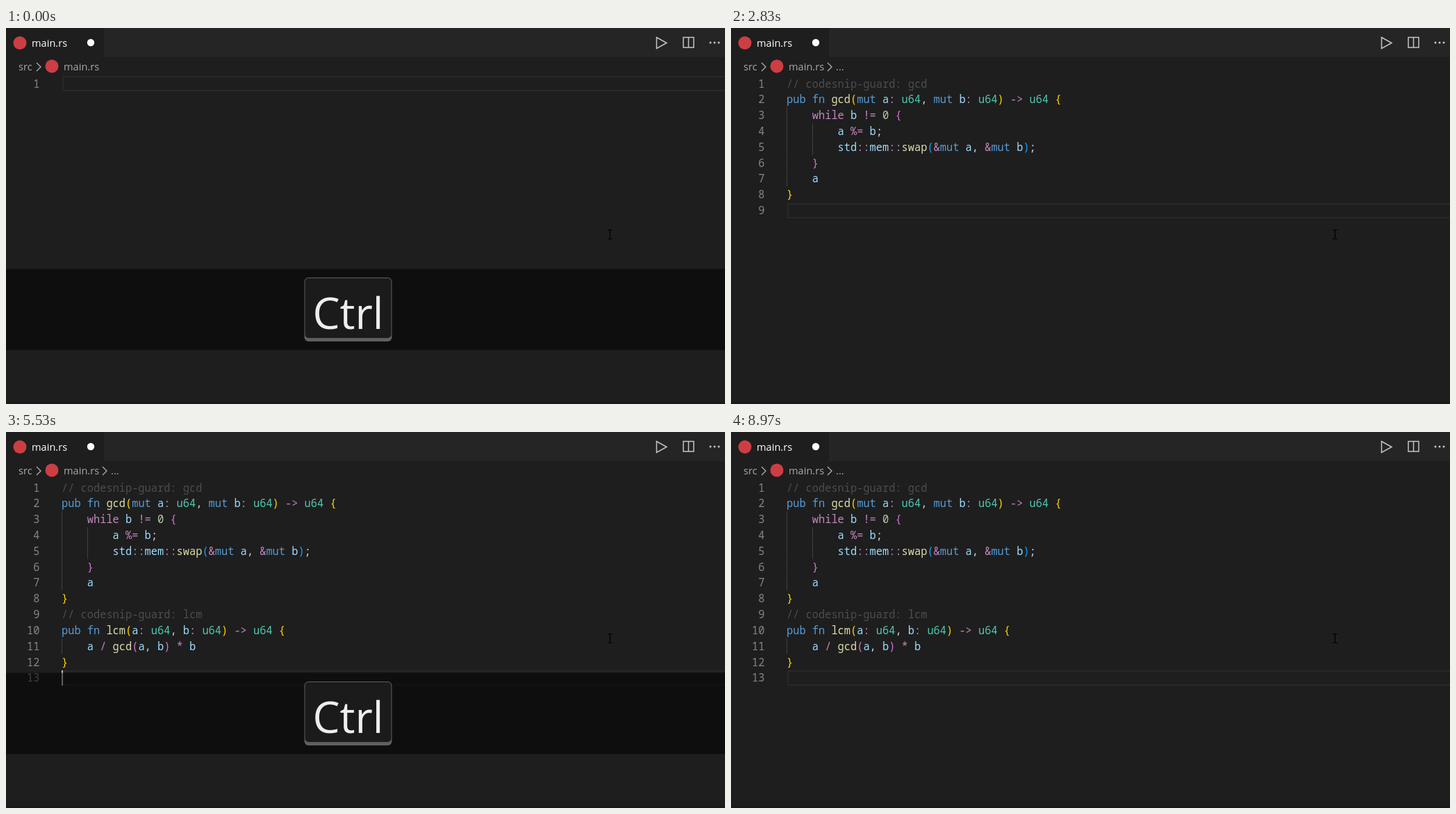
An HTML page with a canvas that plays this animation: 1035x541 px, repeating every 9.01 s.

```html
<!DOCTYPE html>
<html lang="en">
<head>
<meta charset="utf-8">
<title>Snippet insertion</title>
<style>
  html, body { margin: 0; width: 100%; height: 100%; overflow: hidden; background: #1e1e1e; }
  canvas { display: block; }
</style>
</head>
<body>
<canvas id="stage" width="1035" height="541"></canvas>
<script>
const ctx = document.getElementById('stage').getContext('2d');
const LOOP = 9010;
const UI = '14.6px "Open Sans", "Noto Sans", sans-serif';
const MONO = '15.33px "Noto Sans Mono", "DejaVu Sans Mono", monospace';
const KEY = '62px "Open Sans", "Noto Sans", sans-serif';
const LEFT = 80, CHAR = 9.2, LINE = 22.83;

const CODE = [
  '// codesnip-guard: gcd',
  'pub fn gcd(mut a: u64, mut b: u64) -> u64 {',
  '    while b != 0 {',
  '        a %= b;',
  '        std::mem::swap(&mut a, &mut b);',
  '    }',
  '    a',
  '}',
  '// codesnip-guard: lcm',
  'pub fn lcm(a: u64, b: u64) -> u64 {',
  '    a / gcd(a, b) * b',
  '}'
];
const BRACKETS = ['#ffd700', '#da70d6', '#179fff'];

// Split the code into coloured tokens; brackets take the colour of their depth.
let depth = 0;
const TOKENS = CODE.map(line =>
  [...line.matchAll(/\/\/.*|\w+|[(){}]|[;,]|[^\s\w(){};,]+/g)].flatMap(match => {
    const text = match[0], col = match.index, next = line[col + text.length];
    if (/^[({]/.test(text)) return { text, col, bracket: true, color: BRACKETS[depth++ % 3] };
    if (/^[)}]/.test(text)) return { text, col, bracket: true, color: BRACKETS[--depth % 3] };
    const color =
      text.startsWith('//') ? '#4d4d4d' :
      /^(pub|fn|mut)$/.test(text) ? '#569cd6' :
      text === 'while' ? '#c586c0' :
      text === 'u64' ? '#4ec9b0' :
      /^\d/.test(text) ? '#b5cea8' :
      /^\w/.test(text) ? (next === '(' ? '#dcdcaa' : '#9cdcfe') :
      /[;,]/.test(text) ? '#d4d4d4' : '#c586c0';
    return { text, col, color };
  }));

const LISTS = {
  '': ['primes', 'MonoidalOperation', 'ConvexHullTrick', 'RollingHash', 'automaton',
       'PrimalDual', 'BitXorOperation', 'convex_hull'],
  g: ['gcd', 'graph', 'geometry', 'RollingHash', 'SegmentTree', 'bigint', 'digit_dp', 'tree_degree'],
  l: ['lcm', 'lis', 'LazySegmentTree', 'ConvexHullTrick', 'MonoidalOperation',
      'RollingHash', 'PrimalDual', 'convex_hull']
};

const PICKERS = [
  { open: 370, close: 1440, typed: 980, query: 'g' },
  { open: 3140, close: 4180, typed: 3750, query: 'l' },
  { open: 7190, close: 7820, typed: 7570, query: 'l' }
];
const KEYS = [
  [0, 'Ctrl'], [120, 'Ctrl+Alt'], [300, 'Ctrl+Alt+B'], [980, 'Ctrl+Alt+B G'],
  [1400, 'Ctrl+Alt+B G Enter'], [2200, ''],
  [2840, 'Ctrl'], [2940, 'Ctrl+Alt'], [3060, 'Ctrl+Alt+B'], [3750, 'Ctrl+Alt+B L'],
  [4100, 'Ctrl+Alt+B L Enter'], [4900, ''],
  [5410, 'Ctrl'], [5590, 'Ctrl+A'], [5990, 'Backspace'], [6790, ''],
  [6850, 'Ctrl'], [6960, 'Ctrl+Alt'], [7120, 'Ctrl+Alt+B'], [7570, 'Ctrl+Alt+B L'],
  [7770, 'Ctrl+Alt+B L Enter'], [8570, '']
];
// Number of code lines, and the first line each insertion adds.
const EDITS = [[0, 0, 0], [1870, 8, 0], [4430, 12, 8], [5990, 0, 0], [8230, 12, 0]];
const BLINK_STARTS = [[-500], [1440], [1870], [4180], [4430], [5990], [7820], [8230]];

const latest = (events, t) => events.filter(e => e[0] <= t).pop();
const within = (t, from, to) => t >= from && t < to;
const clamp = v => Math.max(0, Math.min(1, v));

function rect(x, y, w, h, color) {
  ctx.fillStyle = color;
  ctx.fillRect(x, y, w, h);
}

function disc(x, y, r, color) {
  ctx.fillStyle = color;
  ctx.beginPath();
  ctx.arc(x, y, r, 0, 2 * Math.PI);
  ctx.fill();
}

function stroke(path, color, width) {
  ctx.strokeStyle = color;
  ctx.lineWidth = width;
  ctx.stroke(new Path2D(path));
}

function label(text, x, y, color, font = UI, align = 'left') {
  ctx.font = font;
  ctx.textAlign = align;
  ctx.fillStyle = color;
  ctx.fillText(text, x, y);
}

function drawChrome(t) {
  rect(0, 0, 1035, 541, '#1e1e1e');
  rect(141, 0, 894, 42, '#252526');
  rect(0, 538, 1035, 3, '#1a1a1a');
  disc(20, 21.5, 9.5, '#cc3e44');
  label('main.rs', 37, 27, '#ffffff');
  disc(122, 21, 5.2, '#ffffff');

  stroke('M936.5 13.5 L951 21.5 L936.5 29.5 Z', '#c5c5c5', 1.5);
  stroke('M975 13.5 H990 V28 H975 Z M982.5 13.5 V28', '#c5c5c5', 1.5);
  for (const x of [1014, 1020, 1026]) disc(x, 21, 1.5, '#c5c5c5');

  label('src', 18, 61, '#a9a9a9');
  stroke('M44 50 L50 56 L44 62', '#a9a9a9', 1.4);
  disc(66, 55, 9.5, '#cc3e44');
  label('main.rs', 83, 61, '#a9a9a9');
  if (within(t, 1960, 6500) || t >= 8300) {
    stroke('M139 50 L145 56 L139 62', '#a9a9a9', 1.4);
    label('...', 151, 61, '#a9a9a9');
  }
}

function drawEditor(t, pickerOpen) {
  const [editTime, count, firstNew] = latest(EDITS, t);
  const center = i => 80 + i * LINE;
  const selected = within(t, 5590, 5990);

  if (!selected) {
    ctx.strokeStyle = '#282828';
    ctx.lineWidth = 2;
    ctx.strokeRect(82, Math.round(center(count)) - 10, 960, 20);
  }

  for (let i = 0; i <= count; i++) {
    const y = center(i), line = CODE[i];
    label(i + 1, 48.5, y + 5.5, '#858585', MONO, 'right');
    if (i === count) break;
    if (selected) rect(LEFT, y - LINE / 2, (line.length + 1) * CHAR, LINE, '#264f78');
    const indent = line.search(/\S/);
    for (let col = 0; col < indent; col += 4)
      rect(Math.round(LEFT + col * CHAR), y - LINE / 2, 1, LINE, '#404040');
    const plain = i >= firstNew && t < editTime + 120;
    for (const token of TOKENS[i])
      label(token.text, LEFT + token.col * CHAR, y + 5.5,
        token.bracket && plain ? '#d4d4d4' : token.color, MONO);
  }

  const blinkStart = latest(BLINK_STARTS, t)[0];
  if (!pickerOpen && Math.floor((t - blinkStart) / 500) % 2 === 0)
    rect(80, Math.round(center(count)) - 11, 2, 22, '#c0c0be');
}

function drawPicker(t, { open, typed, query }) {
  const text = t >= typed ? query : '';
  const age = t - open;
  ctx.save();
  ctx.shadowColor = '#000';
  ctx.shadowBlur = 9;
  ctx.shadowOffsetY = 1;
  rect(152, -4, 688, 270, '#252526');
  ctx.restore();

  rect(159, 8, 674, 32, '#3c3c3c');
  ctx.strokeStyle = '#2180b9';
  ctx.lineWidth = 1.5;
  ctx.strokeRect(159.5, 8.25, 673, 31.5);
  label(text || 'name', 165.5, 30, text ? '#cccccc' : '#868686');
  const caretX = 165 + (text ? ctx.measureText(text).width + 1 : 0);
  if (Math.floor((text ? t - typed : age) / 500) % 2 === 0) rect(caretX, 14, 1, 20, '#c0c0c0');

  rect(152, 47, 688, 26, '#062f4a');
  LISTS[text].forEach((name, i) => {
    const y = 66 + i * 26.36;
    label(name, 165.5, y, i ? '#cccccc' : '#e2e2e2');
    if (text) {
      const at = name.toLowerCase().indexOf(text);
      const x = 165.5 + ctx.measureText(name.slice(0, at)).width;
      label(name[at], x, y, '#18a3ff');
    }
  });

  if (!text) {
    const alpha = 0.4 * clamp((age - 60) / 100) * clamp((1300 - age) / 800);
    rect(828, 47, 12, 25, `rgba(145,145,145,${alpha})`);
  }
}

function drawKeys(keys) {
  if (!keys) return;
  rect(0, 346.5, 1035, 117, 'rgba(0,0,0,0.52)');
  ctx.font = KEY;
  const advance = part => ctx.measureText(part).width + (part === '+' ? 12 : 0);
  const caps = keys.split(' ').map(name => {
    const parts = name.split(/(\+)/);
    return { parts, width: 24 + parts.reduce((sum, part) => sum + advance(part), 0) };
  });
  const total = caps.reduce((sum, cap) => sum + cap.width + 8, -8);
  let x = 492.5 - total / 2;

  for (const { parts, width } of caps) {
    const shape = (y, h, color) => {
      ctx.fillStyle = color;
      ctx.beginPath();
      ctx.roundRect(x, y, width, h, 6);
      ctx.fill();
    };
    shape(359, 92, '#5f5f5f');
    ctx.fillStyle = '#1b1b1b';
    ctx.beginPath();
    ctx.roundRect(x + 1, 360, width - 2, 86, 5);
    ctx.fill();
    let penX = x + 12;
    for (const part of parts) {
      label(part, penX + (part === '+' ? 6 : 0), 433, '#eeeeee', KEY);
      penX += advance(part);
    }
    x += width + 8;
  }
}

function draw(now) {
  const t = now % LOOP;
  const picker = PICKERS.find(p => within(t, p.open, p.close));
  drawChrome(t);
  drawEditor(t, !!picker);
  if (picker) drawPicker(t, picker);
  stroke('M866 290.5 H868.5 L869.5 291.5 L870.5 290.5 H873 M869.5 291 V303 M866 303.5 H868.5 L869.5 302.5 L870.5 303.5 H873',
    '#000', 1.2);
  drawKeys(latest(KEYS, t)[1]);
}

const start = performance.now();
function frame() {
  draw(performance.now() - start);
  requestAnimationFrame(frame);
}
frame();
</script>
</body>
</html>
```
